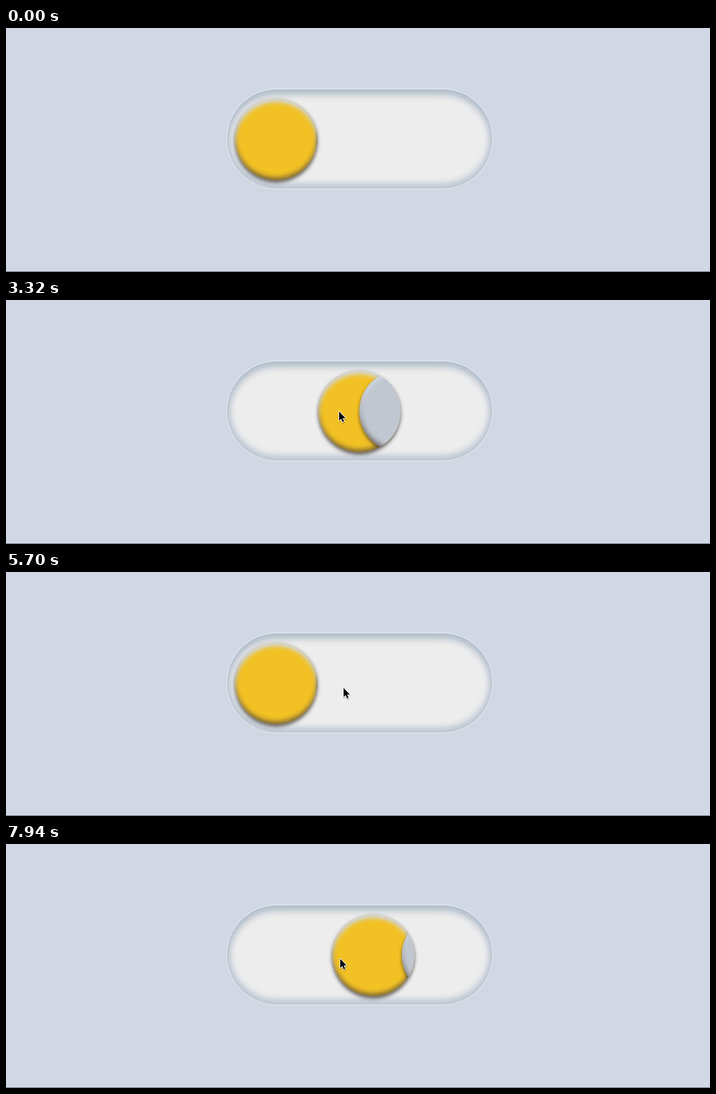
An HTML page for the animation above (8000 ms loop, 1268 by 442 pixels).

```html
<!DOCTYPE html>
<html lang="en">
<head>
<meta charset="utf-8">
<title>Sun and moon toggle</title>
<style>
  html, body { margin: 0; width: 100%; height: 100%; overflow: hidden; }
  body { position: relative; background: #d1d7e4; }
  body::after {
    content: ""; position: absolute; left: 0; top: 441px;
    width: 100%; height: 1px; background: #50555f;
  }
  div, svg { position: absolute; }
  .track {
    left: 398px; top: 111px; width: 478px; height: 180px; border-radius: 90px;
    background: #ededed;
    box-shadow:
      inset 0 9px 13px #b1bcc8,
      inset 0 -9px 12px #bfc8d4,
      inset 0 0 16px 3px #c9d1de,
      0 0 0 1.3px #e6edf6,
      0 5px 5px rgba(206, 216, 214, .6);
  }
  .knob, .disc { width: 149px; height: 149px; border-radius: 50%; }
  .knob {
    left: 412px; top: 126.5px; overflow: hidden;
    box-shadow: 0 4px 6px rgba(60, 55, 50, .75);
  }
  .disc {
    box-shadow:
      inset 0 7px 8px #d1d8e3,
      inset 0 -5px 8px rgba(80, 70, 60, .75),
      0 4px 6px rgba(60, 55, 50, .75);
  }
  .sun { background: #f2c124; }
  .moon { background: #c1c7d0; }
  .cursor { left: -3px; top: -3px; overflow: visible; }
</style>
</head>
<body>
<div class="track"></div>
<div class="knob" id="knob">
  <div class="disc sun"></div>
  <div class="disc moon" id="moon"></div>
</div>
<svg class="cursor" id="cursor" width="20" height="28" viewBox="-3 -3 20 28">
  <path d="M0 0V16.4L3.7 13L6.2 19L8.9 17.9L6.4 12H11.4Z" transform="translate(.6 2)"
        fill="none" stroke="#000" stroke-opacity=".15" stroke-width="3" stroke-linejoin="round"/>
  <path d="M0 0V16.4L3.7 13L6.2 19L8.9 17.9L6.4 12H11.4Z" fill="#000" stroke="#fff"
        stroke-width="2" paint-order="stroke" stroke-linejoin="round"/>
</svg>
<script>
const LOOP = 8000;
const TRAVEL = 300;
const SIZE = 149;
const RATE = 1 / 24;
const [knob, moon, cursor] = ["knob", "moon", "cursor"].map(id => document.getElementById(id));

// Ticks at which the toggle flips, starting from the sun
const clicks = [59, 98, 134, 155.3, 166.3];

// Cursor legs: first and last tick, end point, optional bend of the curve
const entry = { x: 1171, y: 348 };
const legs = [
  { from: 11, to: 19, x: 631, y: 323, bend: [860, 270] },
  { from: 34, to: 46, x: 418, y: 178, bend: [760, 40] },
  { from: 46, to: 59, x: 600, y: 202 },
  { from: 80, to: 86, x: 701, y: 209 },
  { from: 86, to: 88, x: 666, y: 218 },
  { from: 116, to: 122, x: 608, y: 210 },
  { from: 122, to: 135, x: 602, y: 208, bend: [460, 190] }
];

const clamp = v => Math.min(1, Math.max(0, v));
const easeOut = u => u * (2 - u);

// Motion advances three ticks every 140 ms, held 20, 20 and 100 ms
function tickAt(ms) {
  const s = ms - 60;
  const group = Math.floor(s / 140);
  const rest = s - group * 140;
  return group * 3 + (rest < 20 ? 0 : rest < 40 ? 1 : 2);
}

// Runs at a steady rate towards 1 after odd clicks and towards 0 after even ones
function progress(tick, up, down) {
  let value = 0;
  clicks.forEach((click, i) => {
    const span = Math.min(tick, clicks[i + 1] ?? Infinity) - click;
    if (span > 0) value = clamp(value + span * (i % 2 ? -down : up));
  });
  return value;
}

function cursorAt(tick) {
  let p = entry;
  for (const leg of legs) {
    if (tick <= leg.from) break;
    const u = easeOut(clamp((tick - leg.from) / (leg.to - leg.from)));
    const [bx, by] = leg.bend || [(p.x + leg.x) / 2, (p.y + leg.y) / 2];
    const curve = (a, b, c) => a * (1 - u) ** 2 + 2 * b * u * (1 - u) + c * u * u;
    p = { x: curve(p.x, bx, leg.x), y: curve(p.y, by, leg.y) };
  }
  return p;
}

function move(el, x, y) {
  el.style.transform = `translate(${x}px, ${y}px)`;
}

function draw(ms) {
  const tick = tickAt(ms);
  const pointer = cursorAt(tick);
  move(knob, progress(tick, RATE, RATE) * TRAVEL, 0);
  move(moon, (1 - progress(tick, RATE, 2 * RATE)) * SIZE, 0);
  move(cursor, pointer.x, pointer.y);
  cursor.style.visibility = tick < legs[0].from ? "hidden" : "visible";
}

const start = performance.now();
function loop() {
  draw((performance.now() - start) % LOOP);
  requestAnimationFrame(loop);
}
loop();
</script>
</body>
</html>
```
